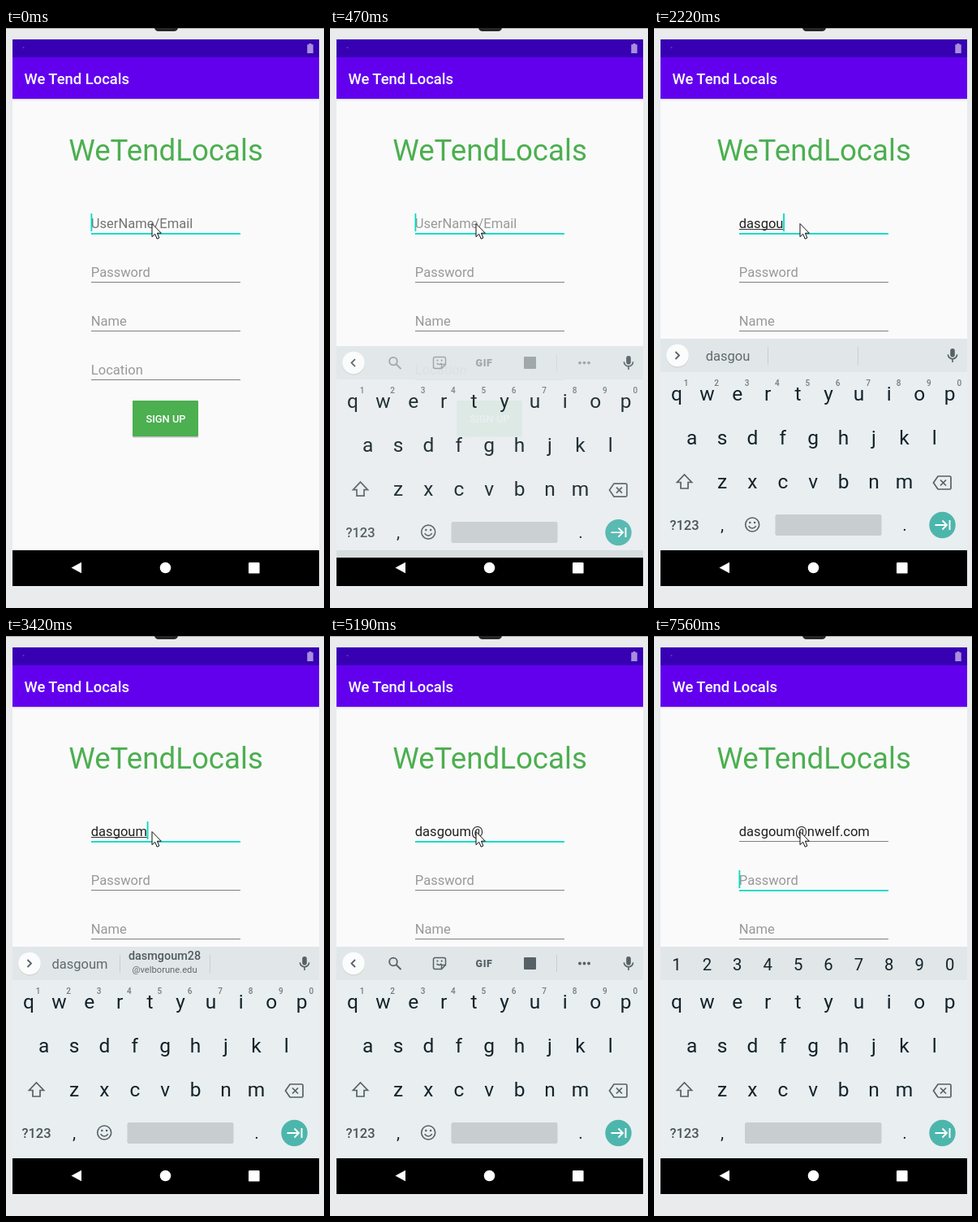
These frames come from a looping animation (392x713 px, 8 s). An HTML page:

```html
<!DOCTYPE html>
<html lang="en">
<head>
<meta charset="utf-8">
<title>Sign up</title>
<style>
html, body { margin: 0; width: 100%; height: 100%; overflow: hidden; background: #e9ebed; }
svg { display: block; width: 392px; height: 713px; }
text { font-family: Roboto, "Noto Sans", sans-serif; white-space: pre; }
</style>
</head>
<body>
<svg id="stage" viewBox="0 0 392 713"></svg>
<script>
const LOOP = 8000;
const stage = document.getElementById('stage');

function el(tag, attrs, parent = stage) {
  const node = document.createElementNS('http://www.w3.org/2000/svg', tag);
  for (const k in attrs) node.setAttribute(k, attrs[k]);
  parent.appendChild(node);
  return node;
}
const group = (parent, attrs = {}) => el('g', attrs, parent);
const rect = (x, y, width, height, fill, parent, rx = 0) =>
  el('rect', { x, y, width, height, fill, rx }, parent);
const circle = (cx, cy, r, fill, parent) => el('circle', { cx, cy, r, fill }, parent);
const fillPath = (d, fill, parent) => el('path', { d, fill }, parent);
const line = (d, stroke, w, parent) =>
  el('path', { d, stroke, 'stroke-width': w, fill: 'none' }, parent);
function label(str, x, y, size, fill, parent, anchor = 'start', weight = 400) {
  const t = el('text', { x, y, 'font-size': size, fill, 'text-anchor': anchor, 'font-weight': weight }, parent);
  t.textContent = str;
  return t;
}
const mid = (str, x, y, size, fill, parent, weight) => label(str, x, y, size, fill, parent, 'middle', weight);
const show = (node, on) => node.setAttribute('visibility', on ? 'visible' : 'hidden');

const TEAL = '#03dac5', GREEN = '#4caf50', HINT = '#999', RULE = '#808080';
const INK = '#14232a', ICON = '#566166';
const X0 = 104.8;

// Device edge
rect(0, 0, 392, 1, '#a9abad');
fillPath('M183 0H212Q211 4 207 4H188Q184 4 183 0Z', '#252527');

// Screen
rect(8, 14, 378, 628, '#fafafa');
rect(8, 87, 378, 1, '#d9d7de');
rect(8, 88, 378, 1.5, '#f0eff2');
rect(8, 14, 378, 22, '#3700b3');
rect(8, 36, 378, 51, '#6200ee');
circle(21.5, 24, 1.1, '#5d35c4');
fillPath('M373.5 19h3v1.3h2.2V31h-7.4V20.3h2.2Z', '#a98fdd');
label('We Tend Locals', 22.5, 68.5, 18.4, '#fff', stage, 'start', 500);
mid('WeTendLocals', 197, 163, 36.7, GREEN);

// Form
const hints = ['UserName/Email', 'Password', 'Name', 'Location'].map(
  (s, i) => label(s, X0, 246 + 60 * i, 16.55, HINT));
const rules = hints.map((_, i) => rect(105, 252 + 60 * i, 184, 1, RULE));
const entry = label('', X0, 246, 16.55, '#212121');
const composing = rect(105, 247, 0, 1, '#333');
const caret = rect(X0, 228, 1.8, 22, TEAL);
rect(156, 459, 81, 45, '#dcdcdc', stage, 1);
rect(156, 459, 81, 44, '#bdbdbd', stage, 1);
rect(156, 458, 81, 44, GREEN, stage, 1);
mid('SIGN UP', 197, 485, 12.9, '#fff', stage, 500);

rect(8, 642, 378, 44, '#000');

// Keyboard
const clip = el('clipPath', { id: 'screen' });
rect(8, 14, 378, 672, '#000', clip);
const keyboard = group(group(stage, { 'clip-path': 'url(#screen)' }));
rect(8, 382, 378, 260, '#e9eef1', keyboard);
rect(8, 382, 378, 41, '#e1e6e9', keyboard);

const strip = group(keyboard);
circle(29, 403.6, 14, '#cfd4d7', strip);
circle(29, 402.5, 13.8, '#fbfcfc', strip);
const chevron = line('', ICON, 1.8, strip);
rect(365.2, 394, 5.6, 10.5, ICON, strip, 2.8);
line('M362.4 401.2a5.6 5.6 0 0 0 11.2 0M368 407v4', ICON, 1.6, strip);

const words = group(strip);
for (const x of [140, 251]) rect(x, 392, 1, 22, '#c9ced1', words);
const slots = [91, 195.5, 300].map(x => mid('', x, 409, 16.5, '#5f696e', words));
const mail = group(words);
mid('dasmgoum28', 195.5, 398, 14.4, '#4f5a5f', mail, 500);
mid('@velborune.edu', 195.5, 414, 11.2, '#5f696e', mail);

const tools = group(strip);
el('circle', { cx: 78, cy: 400.5, r: 4.8, fill: 'none', stroke: ICON, 'stroke-width': 1.8 }, tools);
line('M81.5 404l6 6', ICON, 2, tools);
line('M129.5 395.5h11a2 2 0 0 1 2 2v7l-5 5h-8a2 2 0 0 1-2-2v-10a2 2 0 0 1 2-2ZM142 404.5h-4.5v5M131.5 402.8q2.8 3.4 6 0', ICON, 1.5, tools);
circle(132.5, 399.6, 1.1, ICON, tools);
circle(137.7, 399.6, 1.1, ICON, tools);
el('text', {}, tools);
mid('GIF', 190, 407, 12.4, ICON, tools, 900).setAttribute('letter-spacing', .6);
rect(239, 395, 15, 15, ICON, tools, 1);
rect(279, 392, 1, 21, '#c9ced1', tools);
for (const x of [308, 313.5, 319]) circle(x, 402.5, 1.9, ICON, tools);

const smallDigits = group(keyboard), bigDigits = group(keyboard);
[...'1234567890'].forEach((d, i) => {
  const x = 28 + 37.4 * i;
  mid(d, x + 11.7, 439.5, 10, '#717b80', smallDigits, 500);
  mid(d, x, 411, 20.3, INK, bigDigits);
});
[['qwertyuiop', 28, 458], ['asdfghjkl', 46.6, 512], ['zxcvbnm', 84, 566]].forEach(([keys, x, y]) =>
  [...keys].forEach((k, i) => mid(k, x + 37.4 * i, y, 24.5, INK, keyboard)));

line('M37.5 549l9 9.5h-4.5v7.5h-9v-7.5h-4.5Z', ICON, 1.7, keyboard);
line('M350 551h14.5a1.5 1.5 0 0 1 1.5 1.5v13a1.5 1.5 0 0 1-1.5 1.5H350l-5.5-8ZM353 555.5l7 7M360 555.5l-7 7', ICON, 1.7, keyboard);
mid('?123', 37.5, 617, 16.5, '#4a555a', keyboard, 500);
mid(',', 84, 618, 21, INK, keyboard);
mid('.', 309, 618, 21, INK, keyboard);
const smiley = group(keyboard);
line('M112.7 610.5a8.5 8.5 0 1 0 17 0a8.5 8.5 0 1 0-17 0M116.6 612.2q4.6 5.6 9.2 0', ICON, 1.6, smiley);
circle(118.3, 608, 1.3, ICON, smiley);
circle(124.1, 608, 1.3, ICON, smiley);
const space = rect(149.5, 598, 131, 26, '#c8cdd0', keyboard, 2.5);
circle(355.5, 611, 16.2, '#4db6ac', keyboard);
line('M346.5 611h14M355.5 605.5l5.5 5.5-5.5 5.5M364.5 605v12', '#fff', 1.9, keyboard);

// Navigation
fillPath('M80.5 663.5L93 656.8V670.2Z', '#fff');
circle(196.5, 663.5, 6.8, '#fff');
rect(299, 657, 13.6, 13.6, '#fff', stage, 1.2);

// Mouse pointer
el('path', { d: 'M180 240.5v16.2l3.7-3.5 2.5 6 2.7-1.2-2.5-5.8h5Z', fill: '#fff', stroke: '#111', 'stroke-width': 1 });

// Each step: start, changes to the state
const NAME = 'dasgoum', MAIL = NAME + '@nwelf.com';
const typed = (n, more) => ({ n, caret: 1, ...more });
const steps = [
  [0, { n: 0, caret: 1, rise: 0, tools: 0, words: null, pressed: 1, line: 0, secret: 0 }],
  [150, { rise: .12, pressed: 0 }],
  [300, { rise: .5 }],
  [470, { rise: .93, tools: .5 }],
  [600, { rise: 1, tools: 1, caret: 0 }],
  [1050, { caret: 1 }],
  [1330, typed(1, { tools: 0, words: ['d', 'do', 'did'], line: 1 })],
  [1480, typed(2, { words: ['da', 'day', 'dad'] })],
  [1630, typed(3, { words: ['das', 'dash', 'dads'] })],
  [1920, typed(4, { words: ['dasg', 'dash', 'dads'] })],
  [2070, typed(5, { words: ['dasgo', 'dash', 'disco'] })],
  [2220, typed(6, { words: ['dasgou', '', ''] })],
  [2380, { words: ['dasgou', '@', ''] }],
  [2530, typed(7, { words: [NAME, '@', ''] })],
  [2980, { caret: 0 }],
  [3420, { caret: 1 }],
  [3890, { caret: 0 }],
  [4470, { caret: 1 }],
  [4620, typed(8, { words: null, line: 0, tools: .5 })],
  [4750, { tools: 1 }],
  [5190, { caret: 0 }],
  [5340, typed(9)],
  [5490, typed(10)],
  [5790, typed(11)],
  [5920, typed(12)],
  [6070, typed(13)],
  [6370, typed(14)],
  [6500, typed(15)],
  [6650, typed(16)],
  [6800, typed(17)],
  [7270, { caret: 0 }],
  [7560, { caret: 1, secret: 1, tools: 0 }]
];

function draw(s) {
  entry.textContent = MAIL.slice(0, s.n);
  const w = s.n ? entry.getComputedTextLength() : 0;
  show(hints[0], !s.n);
  hints[0].setAttribute('fill', s.pressed ? '#737373' : HINT);
  composing.setAttribute('width', s.line ? w : 0);
  rules.forEach((r, i) => {
    const focus = i === s.secret;
    r.setAttribute('fill', focus ? TEAL : RULE);
    r.setAttribute('height', focus ? 1.8 : 1);
  });
  show(caret, s.caret);
  caret.setAttribute('x', X0 - .3 + (s.secret ? 0 : w));
  caret.setAttribute('y', s.secret ? 288 : 228);

  keyboard.setAttribute('opacity', s.rise);
  keyboard.setAttribute('transform', `translate(0 ${130 * (1 - s.rise)})`);
  tools.setAttribute('opacity', s.tools);
  chevron.setAttribute('d', s.tools ? 'M31 398l-4.5 4.5 4.5 4.5' : 'M26.5 398l4.5 4.5-4.5 4.5');
  words.setAttribute('opacity', s.words ? 1 : 0);
  const list = s.words || ['', '', ''];
  slots.forEach((t, i) => { t.textContent = list[i] === '@' ? '' : list[i]; });
  mail.setAttribute('opacity', list[1] === '@' ? 1 : 0);

  for (const g of [strip, smallDigits, smiley]) show(g, !s.secret);
  show(bigDigits, s.secret);
  space.setAttribute('x', s.secret ? 112 : 149.5);
  space.setAttribute('width', s.secret ? 168.5 : 131);
}

const states = [];
steps.forEach(([at, change], i) => states.push({ ...states[i - 1], ...change, at }));

const start = performance.now();
let current;
function tick() {
  const t = (performance.now() - start) % LOOP;
  const s = states.filter(x => x.at <= t).pop();
  if (s !== current) draw(current = s);
  requestAnimationFrame(tick);
}
tick();
</script>
</body>
</html>
```
